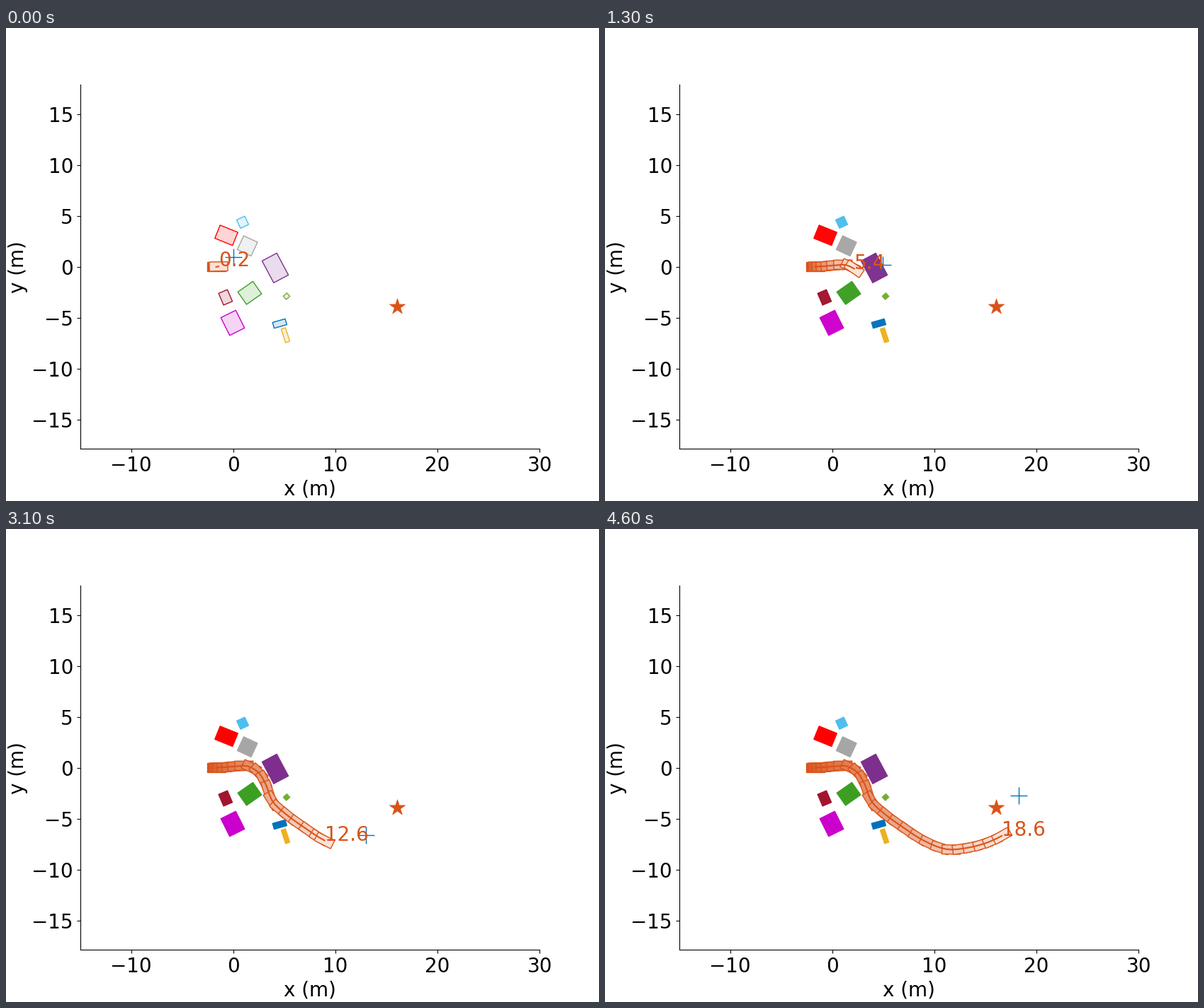
Write a matplotlib script that moves like this. It is 837x669 px and loops after 5700 ms.

```python
import numpy as np
import matplotlib.pyplot as plt
from matplotlib.animation import FuncAnimation
from matplotlib.collections import PolyCollection
from matplotlib.colors import to_rgb

W, H, DPI = 837, 669, 100
MOVING, HOLD, STEP = 47, 10, 100          # frames, frames, ms
ORANGE, BLUE = "#D95319", "#0072BD"
X_MIN, X_MAX = -15, 30
SCALE = 0.775 * W / (X_MAX - X_MIN)       # pixels per metre
Y_MAX = 0.77 * H / SCALE / 2
CAR = (1.8, 0.9)
LIGHT = 0.17                              # tint of the newest outline

# Boxes: centre x, y, width, height (pixels), angle (degrees), colour
BOXES = [
    (311, 293.2, 27, 20, -22, "#FF0000"),
    (334, 274.7, 12.6, 13, 25, "#4DBEEE"),
    (340.7, 308.2, 21.5, 21.5, -25, "#A6A6A6"),
    (380, 339.4, 23.5, 35, 28, "#7E2F8E"),
    (344, 374.7, 26, 21.5, 35, "#3C9F23"),
    (396, 379.4, 6.8, 6.3, 42, "#77AC30"),
    (309.8, 381, 13.5, 18, 23, "#A2142F"),
    (320, 417, 23.5, 28, 26.5, "#CC00CC"),
    (386.3, 418, 18.5, 8.5, 16, BLUE),
    (394.5, 434.5, 6.3, 20, 18, "#EDB120"),
]

# Knots: step, x, y (pixels)
CAR_KNOTS = np.array([
    (0, 300, 337.3), (4, 311, 336.8), (8, 326, 335.6), (11, 341, 335.4),
    (14, 356.5, 344.5), (17, 367, 362), (20, 375.5, 384), (24, 398.5, 406),
    (27, 420, 421.5), (31, 449.5, 440.5), (35, 481, 452.7), (39, 511, 451),
    (43, 540, 443.3), (46, 560, 434)])
AIM_KNOTS = np.array([
    (0, 321, 324), (6, 383, 347), (8, 375, 311), (17, 405, 354),
    (24, 452, 440), (30, 493, 438), (31, 508, 433), (36, 530, 405),
    (39, 539, 394), (42, 584, 377), (46, 584, 377)])


def to_data(px, py):
    """Pixels from the top left corner to metres."""
    x = (np.asarray(px) - 0.125 * W) / SCALE + X_MIN
    y = Y_MAX - (np.asarray(py) - 0.12 * H) / SCALE
    return x, y


def hermite(t, knots_t, v):
    """Smooth curve through the knots, with its derivative."""
    m = np.gradient(v, knots_t, edge_order=2)
    i = np.clip(np.searchsorted(knots_t, t, "right") - 1, 0, len(v) - 2)
    h = knots_t[i + 1] - knots_t[i]
    s = (t - knots_t[i]) / h
    a, b, p, q = v[i], v[i + 1], m[i] * h, m[i + 1] * h
    c2, c3 = 3 * (b - a) - 2 * p - q, 2 * (a - b) + p + q
    return a + s * (p + s * (c2 + s * c3)), (p + s * (2 * c2 + 3 * s * c3)) / h


def rect(cx, cy, w, h, angle):
    corners = np.array([(-1, -1), (1, -1), (1, 1), (-1, 1)]) * (w / 2, h / 2)
    c, s = np.cos(angle), np.sin(angle)
    return corners @ np.array([(c, s), (-s, c)]) + (cx, cy)


def tint(color, weight):
    return tuple(1 - weight * (1 - np.array(to_rgb(color))))


steps = np.arange(MOVING)
kx, ky = to_data(CAR_KNOTS[:, 1], CAR_KNOTS[:, 2])
car_x, vel_x = hermite(steps, CAR_KNOTS[:, 0], kx)
car_y, vel_y = hermite(steps, CAR_KNOTS[:, 0], ky)
heading = np.arctan2(vel_y, vel_x)
start = tuple(float(v) for v in to_data(296.65, 337.85))
shapes = [rect(*p, *CAR, a) for p, a in zip(zip(car_x, car_y), heading)]
start_shape = rect(*start, *CAR, 0)
aim_x, aim_y = to_data(*(np.interp(steps, AIM_KNOTS[:, 0], AIM_KNOTS[:, j])
                         for j in (1, 2)))

plt.rcParams.update({"font.family": "DejaVu Sans", "font.size": 20})
# The small margin keeps the pixel size from being rounded down.
fig, ax = plt.subplots(figsize=((W + 0.01) / DPI, (H + 0.01) / DPI), dpi=DPI)
fig.subplots_adjust(left=0.125, right=0.9, bottom=0.11, top=0.88)
ax.set(xlim=(X_MIN, X_MAX), ylim=(-Y_MAX, Y_MAX),
       xticks=range(-10, 31, 10), yticks=range(-15, 16, 5),
       xlabel="x (m)", ylabel="y (m)")
ax.spines[["top", "right"]].set_visible(False)

colors = [b[5] for b in BOXES]
box_shapes = [rect(*to_data(x, y), w / SCALE, h / SCALE, np.radians(a))
              for x, y, w, h, a, _ in BOXES]
boxes = ax.add_collection(
    PolyCollection(box_shapes, edgecolors=colors, linewidths=1),
    autolim=False)
trail = ax.add_collection(
    PolyCollection([start_shape], edgecolors=ORANGE, linewidths=1),
    autolim=False)
path, = ax.plot([], [], color=ORANGE, lw=1.5)
aim, = ax.plot([], [], "+", color=BLUE, ms=17, mew=1)
ax.scatter(*to_data(551.6, 394), s=280, marker="*", color=ORANGE, lw=0.5,
           zorder=2)
clock = ax.text(*start, "", color=ORANGE, zorder=3)


def draw(frame):
    k = min(frame, MOVING - 1)
    solid = 1 - (1 - LIGHT) * 0.75 ** k
    boxes.set_facecolor([tint(c, solid) for c in colors])

    kept = list(range(0, k, 2)) + [k]
    verts = [start_shape] + [shapes[i] for i in kept]
    trail.set_verts(verts)
    trail.set_facecolor([tint(ORANGE, w)
                         for w in np.linspace(1, LIGHT, len(verts))])
    path.set_data(np.r_[start[0], car_x[:k + 1]],
                  np.r_[start[1], car_y[:k + 1]])
    aim.set_data([aim_x[k]], [aim_y[k]])
    clock.set_position((car_x[k], car_y[k]))
    clock.set_text(f"{0.2 + 0.4 * k:.1f}")
    return boxes, trail, path, aim, clock


anim = FuncAnimation(fig, draw, frames=MOVING + HOLD, interval=STEP,
                     init_func=lambda: draw(0), repeat=True, repeat_delay=0)
plt.show()
```
